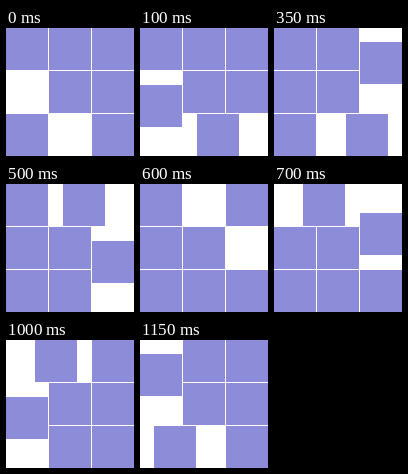
These frames come from a looping animation (128x128 px, 1200 ms). An HTML page:

```html
<!DOCTYPE html>
<html lang="en">
<head>
<meta charset="utf-8">
<title>Sliding tiles loader</title>
<style>
  html, body { margin: 0; width: 100%; height: 100%; overflow: hidden; background: #fff; }
  svg { display: block; width: 100%; height: 100%; }
  rect { fill: #8c8cd9; shape-rendering: crispEdges; }
</style>
</head>
<body>
<svg id="stage" viewBox="0 0 128 128"></svg>
<script>
const PITCH = 43, SIZE = 42;
const TICK = 50, TICKS_PER_MOVE = 3, LOOP = 1200;
// Outer cells, clockwise from the top left
const RING = [[0, 0], [1, 0], [2, 0], [2, 1], [2, 2], [1, 2], [0, 2], [0, 1]];
const stage = document.getElementById('stage');

function addTile() {
  const tile = document.createElementNS('http://www.w3.org/2000/svg', 'rect');
  tile.setAttribute('width', SIZE);
  tile.setAttribute('height', SIZE);
  return stage.appendChild(tile);
}

function place(tile, col, row) {
  tile.setAttribute('x', Math.round(col * PITCH));
  tile.setAttribute('y', Math.round(row * PITCH));
}

place(addTile(), 1, 1);
const tiles = RING.map(addTile);

// Two holes travel anticlockwise; the tile behind each one slides into it.
function draw(ms) {
  const tick = Math.floor((ms % LOOP) / TICK);
  const move = Math.floor(tick / TICKS_PER_MOVE);
  const part = (tick % TICKS_PER_MOVE) / TICKS_PER_MOVE;
  const isHole = i => [5, 7].includes((i + move) % 8);

  tiles.forEach((tile, i) => {
    const next = (i + 1) % 8;
    const p = isHole(next) ? part : 0;
    const [c0, r0] = RING[i], [c1, r1] = RING[next];
    place(tile, c0 + (c1 - c0) * p, r0 + (r1 - r0) * p);
    tile.setAttribute('visibility', isHole(i) ? 'hidden' : 'visible');
  });
}

const start = performance.now();
function frame() {
  draw(performance.now() - start);
  requestAnimationFrame(frame);
}
frame();
</script>
</body>
</html>
```
